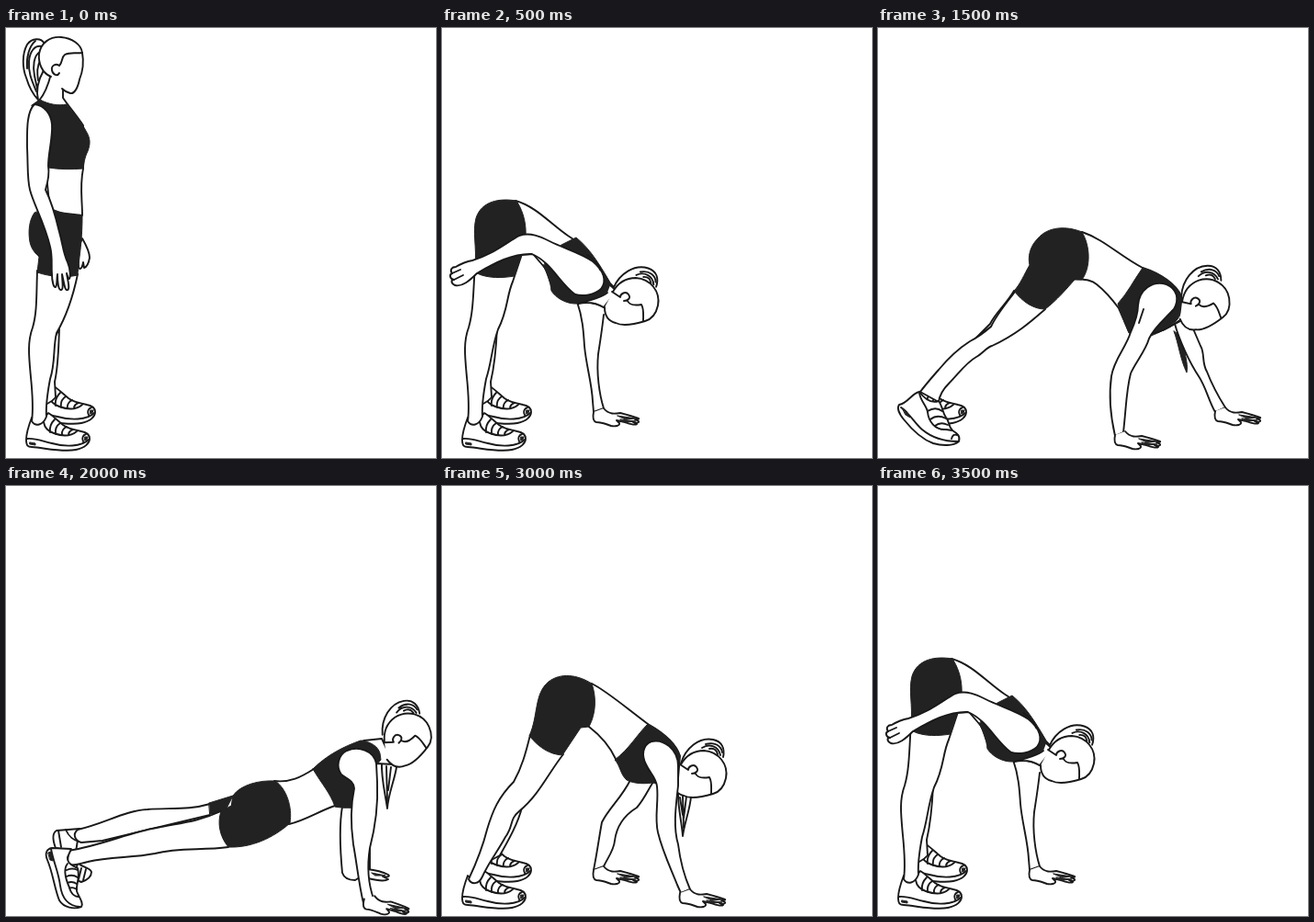
Recreate the animation shown at these times as an HTML page without scripts. Size 468 by 468 pixels, loop 4 s.

```html
<!DOCTYPE html>
<html lang="en">
<head>
<meta charset="utf-8">
<title>Walkout exercise</title>
<style>
html, body { margin: 0; width: 100%; height: 100%; overflow: hidden; background: #fff; }
svg { display: block; width: 100%; height: 100%; }
path { fill: #fff; stroke: #191919; stroke-width: 1.9; stroke-linecap: round; stroke-linejoin: round; }
.dark { fill: #222; stroke: #222; stroke-width: 1; }
.line { fill: none; }
.pose { visibility: hidden; animation: 4s step-end infinite; }
.stand { animation-name: stand; }
.bend { animation-name: bend; }
.reach { animation-name: reach; }
.walk { animation-name: walk; }
.plank { animation-name: plank; }
@keyframes stand { 0% { visibility: visible } 12.5%, 100% { visibility: hidden } }
@keyframes bend { 0%, 25% { visibility: hidden } 12.5%, 87.5%, 100% { visibility: visible } }
@keyframes reach { 0%, 37.5%, 87.5%, 100% { visibility: hidden } 25%, 75% { visibility: visible } }
@keyframes walk { 0%, 50%, 75%, 100% { visibility: hidden } 37.5%, 62.5% { visibility: visible } }
@keyframes plank { 0%, 62.5%, 100% { visibility: hidden } 50% { visibility: visible } }
</style>
</head>
<body>
<svg viewBox="0 0 468 468">
  <defs>
    <clipPath id="frontHalf"><path d="M16-40H80V20H16Z"/></clipPath>
    <g id="shoe">
      <path d="M6-28C3-20 0-12 0-4C0 3 2 4 6 4C20 5 40 10 54 7C64 5 69 0 69-5C69-10 66-12 60-13C50-15 44-17 40-20C34-25 29-30 24-33C18-24 11-22 6-28Z"/>
      <path class="line" d="M1-5C10-6 18-2 28 0C42 4 60 4 68-4M19-23C20-17 24-13 30-11C38-8 48-7 55-13M26-12C25-18 28-23 31-26M32-10C31-16 34-20 37-22M39-9C38-13 41-17 44-18M46-9C46-12 48-14 51-15M62-2C60-6 62-9 65-10"/>
      <path class="dark" d="M64-7L67-7L66-4L64-3ZM4-1L10 0V2L4 1Z"/>
    </g>
    <g id="rearShoe" clip-path="url(#frontHalf)"><use href="#shoe"/></g>
    <g id="bun">
      <path d="M-25-11C-20-28-5-40 10-37C20-35 23-27 21-18"/>
      <path class="line" d="M-2-28C6-33 16-30 18-20M2-32C12-35 19-30 20-23M6-27C11-28 14-25 15-21"/>
    </g>
    <g id="head">
      <path d="M-25-10C-18-22-8-25 0-25C16-24 27-10 24 5C22 14 17 20 10 22C0 25-14 28-22 24C-30 22-34 16-34 7"/>
      <path class="line" d="M-26-10L-17-4C-17-8-11-11-8-7C-5-3-9 0-13 0M-9 0C-7 5 0 5 6 4C9 9 8 15 8 22"/>
    </g>
    <g id="hand">
      <path d="M2-16C8-9 14-10 20-11C28-9 35-7 40-5C41-4 38-4 36-4L40-2C41 0 37 0 34-1L38 1C36 3 31 1 25-1L16-3L19 0C20 3 14 4 10 3C4 1 0-1-6-1C-10-2-10-7-9-12"/>
      <path class="dark" d="M17-8L37-5L26-4ZM20-4L37-2L27-1Z"/>
    </g>
  </defs>

  <g class="pose stand">
    <path d="M42 17C38 10 28 11 23 18C17 29 18 44 22 54C25 64 29 72 35 78C32 66 36 55 41 46Z"/>
    <path class="line" d="M39 20C31 18 26 26 25 36C24 50 29 59 33 69M37 26C30 30 29 42 31 52L34 66M38 34C33 42 34 50 35 57M32 14C25 20 22 32 23 44"/>
    <path d="M83 229C87 236 91 243 91 250C90 256 88 260 85 261L84 255C83 262 80 264 79 260L78 240Z"/>
    <use href="#rearShoe" x="28" y="423"/>
    <path d="M58 328C57 350 57 368 53 385L54 402C50 407 46 408 43 410L45 350Z"/>
    <use href="#shoe" x="22" y="452"/>
    <path d="M34 264C33 290 34 309 29 326C23 342 25 358 27 380C29 400 30 414 28 428C32 434 40 433 44 423C43 410 45 398 48 382C54 364 51 348 55 332C65 315 73 292 78 268"/>
    <path d="M49 50C46 62 42 72 36 79L30 84L44 160L48 200L83 204C83 187 80 172 84 153V106C76 94 68 85 62 76L62 66"/>
    <path class="dark" d="M31 201C25 209 24 222 26 233C28 242 33 246 36 249L34 266C49 271 65 272 78 269C79 252 83 236 83 204C73 204 60 202 48 196Z"/>
    <path class="dark" d="M28 84L37 78C46 83 57 85 66 83C74 94 82 102 87 112C92 120 92 126 89 134C85 142 85 148 84 153C72 154 58 154 46 152L48 120Z"/>
    <path d="M31 83C22 92 23 112 23 130C24 150 23 165 26 176C30 192 42 212 48 238C51 250 49 258 50 268C50 276 52 283 54 282C56 280 55 272 56 268C56 276 57 286 60 285C63 285 61 274 61 268C63 276 64 287 67 285C70 284 67 274 66 267L68 273C71 274 70 262 67 255C62 244 62 236 58 222C54 205 50 190 43 176C46 166 47 156 46 150C46 135 51 120 50 105C49 94 42 84 31 83"/>
    <path d="M49 53C39 49 35 38 36 28C38 16 48 9 60 10C72 11 82 18 83 27C85 38 84 46 80 56C78 66 74 72 70 71C66 70 63 68 61 66"/>
    <path class="line" d="M83 27C76 28 70 26 64 29C60 32 62 37 58 41C54 38 49 41 50 46C51 51 56 53 58 49"/>
  </g>

  <g class="pose bend">
    <use href="#rearShoe" x="28" y="423"/>
    <path d="M60 326C59 348 57 368 53 385L54 402C50 407 46 408 43 410L45 350Z"/>
    <use href="#shoe" x="22" y="452"/>
    <path d="M36 255C34 290 34 309 29 326C23 342 25 358 27 380C29 400 30 414 28 428C32 434 40 433 44 423C43 410 45 398 48 382C54 364 54 348 61 328C72 307 70 292 77 276L87 246"/>
    <path d="M147 298C153 315 154 330 155 346C157 368 163 386 164 406L165 418L176 414C171 398 168 375 170 355C172 342 174 330 176 312"/>
    <use href="#hand" x="174" y="430"/>
    <path d="M80 188C102 194 118 213 137 226C157 238 172 259 183 278L190 285L176 304C170 300 160 298 150 299L130 295C118 286 117 270 112 261L99 246L86 247"/>
    <path class="dark" d="M81 188C63 185 43 188 37 207C33 222 38 239 36 258L38 267C51 273 66 272 79 270L86 248C94 230 93 206 81 188Z"/>
    <path class="dark" d="M130 236L146 228C162 241 174 261 183 278C184 284 180 288 174 291C166 294 160 299 148 300C136 301 124 294 119 286C118 276 115 267 110 259Z"/>
    <path d="M33 253C54 247 68 235 84 226C96 222 107 227 117 232C133 240 151 245 164 254C176 264 180 275 173 284C166 291 153 292 145 290C129 279 119 255 98 246C77 245 57 256 38 267C30 275 22 282 14 280C9 277 10 274 13 274C8 273 8 268 11 267C8 263 11 260 15 260C20 257 27 254 33 253Z"/>
    <path class="line" d="M11 267L20 263M13 274L23 269M158 247C166 252 171 257 172 263"/>
    <path d="M183 280L190 286L176 304C168 299 158 298 148 300C160 297 174 293 180 288"/>
    <use href="#bun" transform="translate(210 297) rotate(7)"/>
    <use href="#head" x="211" y="297"/>
  </g>

  <g class="pose reach">
    <use href="#rearShoe" x="28" y="423"/>
    <path d="M87 350C82 369 72 386 63 402L52 408L68 365Z"/>
    <use href="#shoe" x="22" y="452"/>
    <path d="M96 271C91 291 87 306 78 322C61 339 55 354 49 374C44 394 37 411 29 428C32 434 40 434 44 425C50 411 61 397 69 382C78 370 73 363 84 354C106 336 116 312 132 292"/>
    <path d="M205 320C195 340 182 350 174 366C171 382 169 398 165 418L176 414C180 405 187 397 188 386C190 370 199 358 212 350C220 341 224 331 230 322"/>
    <use href="#hand" x="174" y="430"/>
    <path d="M257 335C257 352 261 366 262 381C264 366 270 352 271 338"/>
    <path class="line" d="M262 337L263 372M266 338L263 362M259 339L262 358"/>
    <use href="#bun" x="285" y="313"/>
    <use href="#head" x="285" y="313"/>
    <path d="M163 215C179 223 196 238 224 259C240 268 255 280 259 294L256 330L215 318L189 297C182 282 173 272 160 262"/>
    <path class="dark" d="M163 215C147 205 129 203 116 213C100 226 105 250 95 272C106 285 117 292 131 293L151 263L160 262C168 247 168 229 163 215Z"/>
    <path class="dark" d="M224 259C237 266 254 279 259 293L257 310L234 322C222 325 208 324 201 320C194 314 194 304 188 298C204 286 211 272 224 259Z"/>
    <path d="M257 305C257 286 241 275 228 278C218 282 217 293 222 303C226 312 233 317 234 327C236 344 231 360 235 377C240 398 249 416 256 434L260 443L270 439C263 423 259 406 257 390C251 370 255 345 257 326Z"/>
    <use href="#hand" x="268" y="455"/>
  </g>

  <g class="pose walk">
    <use href="#rearShoe" x="27" y="423"/>
    <path d="M148 286C140 300 128 310 122 322L104 340L132 318Z"/>
    <path d="M150 286C139 300 129 312 123 325C115 332 108 337 100 341C86 350 75 361 66 372C58 381 52 388 46 396L66 407C67 399 71 393 77 387C87 377 96 364 107 358C114 354 119 347 124 346C150 334 166 320 182 306"/>
    <path d="M45 396C36 398 33 408 23 410C20 414 24 421 28 426C36 436 46 447 60 452C70 455 82 455 88 450C90 444 86 441 81 438C76 433 78 428 74 424C70 418 70 411 66 406C58 409 51 404 45 396Z"/>
    <path class="line" d="M25 413C34 419 40 430 48 437C60 447 74 450 87 450M45 397C46 406 53 411 54 418C55 428 62 438 74 437L81 438M54 417C60 413 66 414 70 417M57 426C62 422 68 422 74 425M62 433C67 429 72 430 76 432M80 447C81 443 83 442 86 443"/>
    <path class="dark" d="M26 413L31 417L35 424L30 421Z"/>
    <path class="dark" d="M322 330C327 343 329 361 336 375C338 365 333 351 330 336Z"/>
    <path d="M323 322C328 340 339 364 349 379C357 391 360 406 367 418L378 413C371 402 363 387 358 374C352 364 356 354 351 346L342 325"/>
    <use href="#hand" x="376" y="429"/>
    <path d="M222 222C246 230 263 248 288 261C307 267 325 279 330 292L333 317L310 329L273 330L262 305C251 290 243 283 238 279C232 274 226 274 215 273"/>
    <path class="dark" d="M222 222C205 215 185 216 174 229C165 238 163 249 165 258C159 268 155 279 148 286C158 299 170 306 182 306C195 296 205 284 214 274L222 274C232 260 231 237 222 222Z"/>
    <path class="dark" d="M288 261C307 267 325 279 330 292C332 304 330 314 324 319C316 327 305 332 297 335L273 332C268 320 264 310 261 300C272 288 278 275 288 261Z"/>
    <path d="M283 302C284 285 299 274 314 279C326 284 328 296 322 306C311 318 301 325 295 338C291 352 280 364 275 376C270 395 270 415 267 440L258 444C253 422 251 400 254 379C257 360 270 348 275 331C280 320 283 310 283 302Z"/>
    <path class="line" d="M289 306L284 321M300 332C315 330 324 320 330 317"/>
    <use href="#hand" x="267" y="455"/>
    <use href="#bun" transform="translate(357 297) rotate(-13)"/>
    <use href="#head" transform="translate(358 298) rotate(-21)"/>
  </g>

  <g class="pose plank">
    <path d="M80 373L55 375C50 378 51 386 54 394L76 398ZM78 410C84 416 91 415 93 420C93 426 88 429 82 431L74 428Z"/>
    <path class="line" d="M57 375L60 393M65 374C68 381 74 386 80 387M82 416L79 428M87 417L84 429"/>
    <path d="M222 346C199 353 177 350 154 352C130 353 106 368 78 374C72 379 75 386 82 388L105 386L222 358"/>
    <path class="dark" d="M221 345L247 337L237 357L222 357Z"/>
    <path d="M234 354C208 366 187 367 164 372C134 377 105 391 68 397L67 412C75 414 80 411 89 409C113 403 137 405 162 400C189 393 212 397 242 393"/>
    <path d="M71 395L50 394C44 395 42 400 45 407C51 421 53 439 58 451C63 459 74 461 82 458C85 454 79 447 77 441C76 432 81 427 78 416C74 414 66 411 67 404Z"/>
    <path class="line" d="M49 395C52 411 57 419 59 435C61 449 68 457 80 458M67 411C62 417 65 428 69 437C71 445 76 447 79 447M66 418C70 416 74 416 78 418M66 425C70 423 75 424 78 426M67 432C71 430 74 431 77 433M69 438C72 436 74 437 77 439"/>
    <path class="dark" d="M46 399L49 398L51 408L48 407Z"/>
    <path d="M366 349C362 372 364 400 366 421C368 427 373 429 380 429L396 419V350Z"/>
    <path d="M393 417C402 418 410 420 416 423C419 425 414 426 410 425L416 428C412 431 402 429 394 427"/>
    <path class="dark" d="M398 421L413 424L402 424Z"/>
    <path d="M409 299C408 318 413 336 415 351C416 335 423 320 425 306"/>
    <path class="line" d="M414 305L415 343M419 306L416 331"/>
    <path d="M292 321C309 323 321 317 335 308C355 292 371 283 390 277L409 275L422 303L403 302L378 350L358 348C340 354 326 364 308 368"/>
    <path class="dark" d="M247 337C255 325 276 320 293 321C305 329 312 349 309 367C291 383 267 394 242 393C232 381 230 366 234 354L245 348Z"/>
    <path class="dark" d="M334 308C350 292 369 283 386 277C396 278 405 283 407 291L408 298L402 305L378 349C371 351 363 350 358 349C353 334 344 325 334 308Z"/>
    <path d="M403 302C400 287 383 283 371 288C361 293 359 306 365 314C371 319 378 320 379 329C375 348 375 368 378 390C382 412 384 433 389 454L400 449C394 432 393 413 396 394C402 371 405 345 404 322Z"/>
    <use href="#hand" transform="translate(398 462) rotate(4)"/>
    <use href="#bun" transform="translate(437 272) rotate(-21)"/>
    <use href="#head" transform="translate(438 272) rotate(-36)"/>
  </g>
</svg>
</body>
</html>
```
